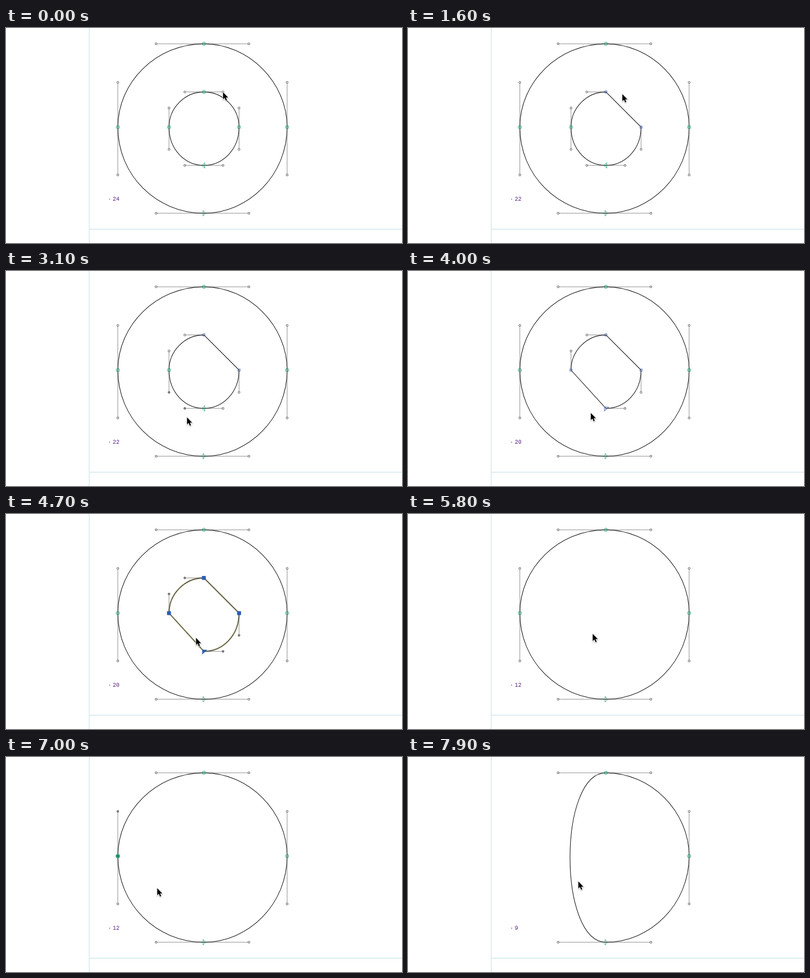
An HTML page with a canvas that plays this animation: 704 px wide and 382 px high, repeating every 8 s.

```html
<!DOCTYPE html>
<html lang="en">
<head>
<meta charset="utf-8">
<title>Outline editing</title>
<style>
  html, body { margin: 0; width: 100%; height: 100%; overflow: hidden; background: #fff; }
  canvas { display: block; }
</style>
</head>
<body>
<canvas id="stage" width="704" height="382"></canvas>
<script>
const ctx = document.getElementById('stage').getContext('2d');
const LOOP = 8000, STEP = 100;
const GREEN = '#36a37c', BLUE = '#2c5db5', BLUE_LINE = '#5470b8', GREY = '#8f8f8f';

// Pointer moves: start time, end time, end point, optional waypoints per step
const moves = [
  { start: 1500, end: 2300, to: [274, 190] },
  { start: 2400, end: 3100, to: [321, 259], marquee: true },
  { start: 3800, end: 4500, to: [337, 219] },
  { start: 5700, end: 6400, to: [167, 92] },
  { start: 6500, end: 7000, to: [268, 232], marquee: true,
    via: [[167, 92], [183, 120], [223, 187], [250, 215], [263, 229], [268, 232]] },
  { start: 7700, end: 7900, to: [302, 220] }
];
moves.reduce((from, move) => (move.from = from, move.to), [385, 113]);

function pointerAt(t) {
  const move = moves.filter(m => t >= m.start).pop();
  if (!move) return moves[0].from;
  if (t >= move.end) return move.to;
  if (move.via) return move.via[Math.floor((t - move.start) / STEP)];
  const u = (t - move.start) / (move.end - move.start), eased = u * u * (3 - 2 * u);
  return move.from.map((v, i) => v + (move.to[i] - v) * eased);
}

const node = (x, y, before, after, arrow) => ({ x, y, before, after, arrow });

function outerContour(t) {
  const nodes = [
    node(352, 329, [267, 329], [432, 329], 'right'),
    node(500, 176, [500, 261], [500, 96.5]),
    node(352, 28, [432, 28], [267, 28]),
    node(199, 176, [199, 96.5], [199, 261])
  ];
  if (t >= 7400) nodes.pop();
  else if (t >= 6800) nodes[3].selected = nodes[3].beforeSelected = true;
  return nodes;
}

function innerContour(t) {
  const nodes = [
    node(352, 244, [386, 244], [318, 244], 'left'),
    node(290, 176, [290, 215.5], [290, 142]),
    node(352, 113.5, [318, 113.5], [386, 113.5]),
    node(414.5, 176, [414.5, 142], [414.5, 215.5])
  ];
  const [bottom, left, top, right] = nodes;
  const straighten = (a, b) => {
    a.after = b.before = null;
    a.corner = b.corner = true;
  };
  if (t >= 1200) straighten(top, right);
  if (t >= 3500) straighten(bottom, left);
  else if (t >= 3100) bottom.afterSelected = left.beforeSelected = true;
  if (t >= 4700) for (const n of nodes) n.selected = n.beforeSelected = n.afterSelected = true;
  return nodes;
}

function stroke(color, width = 1) {
  ctx.strokeStyle = color;
  ctx.lineWidth = width;
  ctx.stroke();
}

function line(x1, y1, x2, y2, color) {
  ctx.beginPath();
  ctx.moveTo(x1, y1);
  ctx.lineTo(x2, y2);
  stroke(color);
}

function dot(x, y, r, fill, edge) {
  ctx.beginPath();
  ctx.arc(x, y, r, 0, Math.PI * 2);
  if (fill) { ctx.fillStyle = fill; ctx.fill(); }
  if (edge) stroke(edge);
}

function polygon(points) {
  ctx.beginPath();
  for (const [x, y] of points) ctx.lineTo(x, y);
  ctx.closePath();
}

function drawArrow(n, next) {
  const angle = n.after ? (n.arrow === 'left' ? Math.PI : 0) : Math.atan2(next.y - n.y, next.x - n.x);
  ctx.save();
  ctx.translate(n.x, n.y);
  ctx.rotate(angle);
  polygon([[3.5, 0], [-1.5, -5], [-1.5, 5]]);
  if (n.selected) { ctx.fillStyle = BLUE; ctx.fill(); }
  stroke(n.selected ? BLUE : n.corner ? BLUE_LINE : GREEN);
  ctx.restore();
}

function drawNode(n, next) {
  if (n.arrow) return drawArrow(n, next);
  if (n.corner) {
    const half = n.selected ? 3 : 2;
    ctx.beginPath();
    ctx.rect(n.x - half, n.y - half, 2 * half, 2 * half);
    if (n.selected) { ctx.fillStyle = BLUE; ctx.fill(); }
    return stroke(n.selected ? BLUE : BLUE_LINE);
  }
  dot(n.x, n.y, n.selected ? 3.5 : 3, n.selected && GREEN, GREEN);
  dot(n.x, n.y, 1.5, n.selected ? '#187052' : GREEN);
}

function drawContour(nodes) {
  const nextOf = i => nodes[(i + 1) % nodes.length];
  const outline = new Path2D();
  outline.moveTo(nodes[0].x, nodes[0].y);
  nodes.forEach((n, i) => {
    const next = nextOf(i);
    outline.bezierCurveTo(...(n.after || [n.x, n.y]), ...(next.before || [next.x, next.y]), next.x, next.y);
  });
  outline.closePath();

  if (nodes.every(n => n.selected)) {
    ctx.strokeStyle = '#e9e6c6';
    ctx.lineWidth = 4;
    ctx.stroke(outline);
  }
  for (const n of nodes)
    for (const h of [n.before, n.after]) if (h) line(n.x, n.y, ...h, '#909090');
  ctx.strokeStyle = '#222';
  ctx.lineWidth = 1.1;
  ctx.stroke(outline);
  for (const n of nodes) {
    if (n.before) dot(...n.before, 1.7, n.beforeSelected ? GREY : '#fff', '#555');
    if (n.after) dot(...n.after, 1.7, n.afterSelected ? GREY : '#fff', '#555');
  }
  nodes.forEach((n, i) => drawNode(n, nextOf(i)));
}

function drawMarquee(t) {
  const move = moves.find(m => m.marquee && t > m.start && t < m.end);
  if (!move) return;
  const [x, y] = move.from, [px, py] = pointerAt(t - STEP);   // the box trails the pointer
  ctx.fillStyle = 'rgba(248, 215, 102, 0.33)';
  ctx.fillRect(x, y, px - x, py - y);
}

function drawCounter(t) {
  const count = t < 1200 ? 24 : t < 3500 ? 22 : t < 5300 ? 20 : t < 7400 ? 12 : 9;
  ctx.fillStyle = '#5b1f86';
  ctx.font = '10px "Liberation Mono", monospace';
  ctx.fillText('·', 181.5, 306.5);
  ctx.fillText(count, 190, 306.5);
}

function drawPointer(t) {
  const [x, y] = pointerAt(t);
  ctx.save();
  ctx.translate(x + 1, y + 1);
  ctx.scale(0.87, 0.87);
  polygon([[0, 0], [0, 14.5], [3.3, 11.5], [5.8, 17], [8.2, 16], [5.8, 10.7], [10.5, 10.7]]);
  ctx.shadowColor = 'rgba(0, 0, 0, 0.3)';
  ctx.shadowBlur = 2;
  ctx.shadowOffsetY = 1;
  stroke('#fff', 2);
  ctx.shadowColor = 'transparent';
  ctx.fillStyle = '#000';
  ctx.fill();
  ctx.restore();
}

function draw(t) {
  ctx.setTransform(1, 0, 0, 1, 0, 0);
  ctx.fillStyle = '#fff';
  ctx.fillRect(0, 0, 704, 382);
  line(148, 0, 148, 382, '#bfdfe3');
  line(148, 357.4, 704, 357.4, '#bfdfe3');
  ctx.translate(-0.2, 0.1);
  drawContour(outerContour(t));
  if (t < 5300) drawContour(innerContour(t));
  drawMarquee(t);
  drawCounter(t);
  drawPointer(t);
}

const began = performance.now();
function frame() {
  const t = (performance.now() - began) % LOOP;
  draw(Math.floor(t / STEP) * STEP);
  requestAnimationFrame(frame);
}
frame();
</script>
</body>
</html>
```
